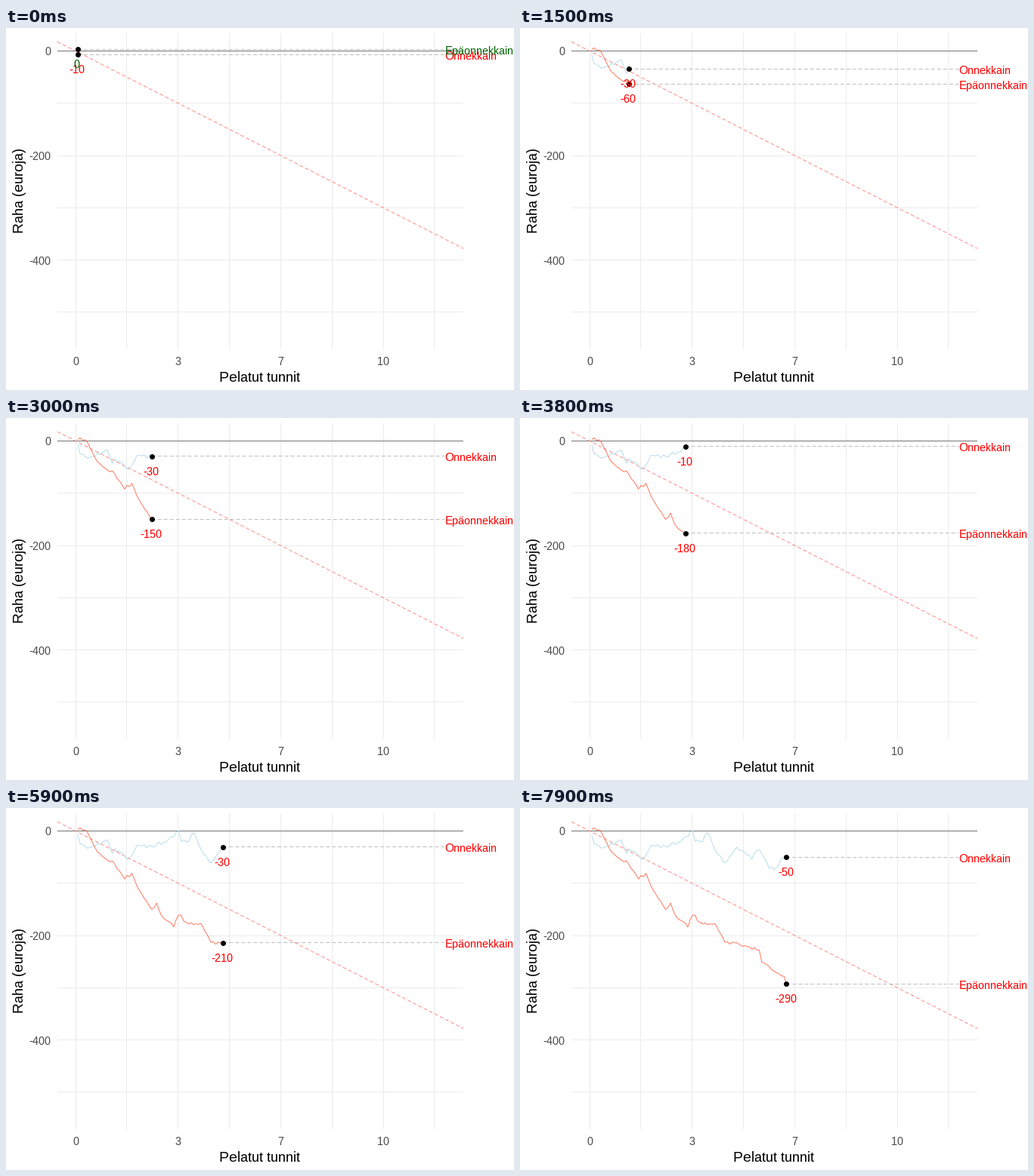
Write a matplotlib script that moves like this. It is 672 px wide and 480 px high and loops after 8000 ms.

```python
import matplotlib.pyplot as plt
import numpy as np
from matplotlib.animation import FuncAnimation

plt.rcParams.update({
    "font.family": "Liberation Sans",
    "text.hinting": "native",
    "text.hinting_factor": 1,
})

W, H, DPI = 672, 480, 96
PX = 72 / DPI  # points per pixel
STEPS = 80
LEFT, RIGHT, TOP, BOTTOM = 68, 605, 7, 426
ZERO_X, STEP = 91.6, 3.2605
ZERO_Y, EURO = 30.5, 0.6925
HOUR = 40.7
LABEL_X = 580.5

# Turning points of each walk: (step, euros)
LUCKY = [(0, -7), (1, -25), (4, -33), (12, -17), (14, -43), (15, -34),
         (21, -53), (24, -28), (30, -29), (36, -21), (41, 0), (42, -20),
         (45, -20), (47, -3), (50, -35), (54, -61), (59, -31), (65, -54),
         (67, -37), (69, -43), (72, -72), (75, -70), (77, -51), (79, -50)]
UNLUCKY = [(0, 3), (1, 6), (4, -3), (8, -40), (15, -63), (19, -92),
           (22, -81), (26, -121), (30, -150), (32, -138), (34, -162),
           (39, -184), (41, -161), (45, -178), (50, -177), (54, -213),
           (59, -214), (68, -228), (69, -251), (78, -278), (79, -293)]

fig = plt.figure(figsize=(W / DPI, H / DPI), dpi=DPI, facecolor="white")
ax = fig.add_axes([0, 0, 1, 1])
ax.set_xlim(0, W)
ax.set_ylim(H, 0)
ax.axis("off")


def to_y(euros):
    return ZERO_Y - EURO * euros


def walk(turns, seed, jitter=4):
    """Balance per step: straight runs between turns, roughened in between."""
    steps, euros = zip(*turns)
    noise = np.random.default_rng(seed).uniform(-jitter, jitter, STEPS)
    noise[list(steps)] = 0
    return np.interp(np.arange(STEPS), steps, euros) + noise


def line(xs, ys, color, z, width=1, dashed=False):
    style = (0, (5 / width, 3 / width)) if dashed else "-"
    return ax.plot(xs, ys, color=color, lw=width * PX, ls=style, zorder=z,
                   snap=False, dash_capstyle="butt",
                   solid_capstyle="butt")[0]


def text(x, y, s, size=15, color="black", ha="center", **kw):
    return ax.text(x, y, s, fontsize=size * PX, color=color, ha=ha,
                   va="baseline", zorder=8, **kw)


# Grid and reference lines
for k in range(8):
    x = int(92 + 67.85 * k) + 0.5
    line([x, x], [TOP, BOTTOM], "#EBEBEB", 1)
for k in range(6):
    y = int(to_y(-100 * k)) + 0.5
    line([LEFT, RIGHT], [y, y], "#EBEBEB", 1)
line([LEFT, RIGHT], [ZERO_Y, ZERO_Y], "#757575", 2)
trend = [to_y(-30 * (x - 92) / HOUR) for x in (LEFT, RIGHT)]
line([LEFT, RIGHT], trend, "#FF7F7F", 3, width=0.9, dashed=True)

# Axis text
for k, s in enumerate(("0", "3", "7", "10")):
    text(92 + 135.7 * k, 447, s, color="#4D4D4D")
for euros in (0, -200, -400):
    text(59.5, to_y(euros) + 6, str(euros), color="#4D4D4D", ha="right")
text(336, 469, "Pelatut tunnit", 18.67)
text(23, 215.5, "Raha (euroja)", 19, rotation=90, rotation_mode="anchor")


class Player:
    def __init__(self, name, balance, color):
        self.balance = balance
        self.xs = ZERO_X + STEP * np.arange(1, STEPS + 1)
        self.ys = to_y(balance)
        self.path = line([], [], color, 5, width=0.85)
        self.lead = line([], [], "#BEBEBE", 4, dashed=True)
        self.dot = ax.plot([], [], "o", color="black", ms=7 * PX,
                           mew=0, zorder=6, snap=False)[0]
        self.amount = text(0, 0, "")
        self.name = text(LABEL_X, 0, name, 14.67, ha="left")

    def update(self, i):
        value, x, y = self.balance[i], self.xs[i], self.ys[i]
        row = int(y) + 0.5
        self.path.set_data(self.xs[:i + 1], self.ys[:i + 1])
        self.lead.set_data([x, LABEL_X], [row, row])
        self.dot.set_data([x], [y])
        self.amount.set_position((x - 1, y + 25))
        self.amount.set_text(str(int(round(value, -1))))
        self.name.set_y(y + 6.5)
        for label in (self.amount, self.name):
            label.set_color("darkgreen" if value >= 0 else "red")
        return [self.path, self.lead, self.dot, self.amount, self.name]


players = [Player("Onnekkain", walk(LUCKY, 3), "lightblue"),
           Player("Epäonnekkain", walk(UNLUCKY, 8), "tomato")]


def update(i):
    return [artist for p in players for artist in p.update(i)]


anim = FuncAnimation(fig, update, frames=STEPS, interval=100,
                     repeat=True, repeat_delay=0, blit=False)
plt.show()
```
